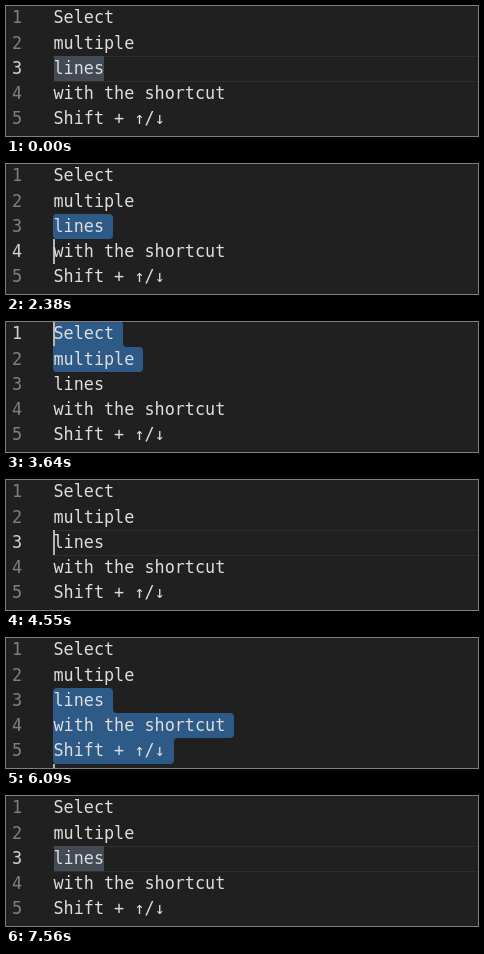
Animation of 472 by 130 pixels, one loop 7770 ms. Source, as an HTML page with a canvas:

```html
<!DOCTYPE html>
<html lang="en">
<head>
<meta charset="utf-8">
<title>Select lines</title>
<style>
  html, body { margin: 0; width: 100%; height: 100%; overflow: hidden; background: #202020; }
  #stage { position: relative; width: 472px; height: 130px; overflow: hidden; }
  canvas { position: absolute; left: 0; top: 0; }
  span {
    position: absolute;
    font: 16.8px/25px "DejaVu Sans Mono", monospace;
    white-space: pre;
    color: #dedede;
  }
  .num { left: 6px; color: #808080; }
  .num.active { color: #d2d2d2; }
  .code { left: 47.5px; }
</style>
</head>
<body>
<div id="stage"><canvas width="472" height="130"></canvas></div>
<script>
const LOOP = 7770;
const LINES = ["Select", "multiple", "lines", "with the shortcut", "Shift + ↑/↓"];
const ANCHOR = 3, LEFT = 47, CHAR = 10.11, ROW = 25.25;

// Key presses; each one walks the cursor a line further
const KEYS = [560, 840, 1260, 2030, 2380, 2660, 3360, 3640, 4200, 4550, 5250, 5530, 5880, 6580, 7000, 7280];
// The caret turns on, off, on ...
const BLINKS = [350, 840, 1260, 1820, 2380, 2660, 3220, 4690, 5250, 5530, 6090, 6580, 7000, 7560];

const stage = document.getElementById("stage");
const ctx = stage.querySelector("canvas").getContext("2d");
const rowTop = n => Math.round(ROW * (n - 1) - 0.6);
const rowEnd = n => Math.floor(LEFT + (LINES[n - 1].length + 1) * CHAR);
const passed = (times, t) => times.filter(x => x <= t).length;

// Zigzag 3 → 6 → 1 → 6 → 3
const cursorLine = step => 1 + Math.abs((step + 7) % 10 - 5);
// The word under the cursor is marked late on the two middle visits
const wordMarked = t => !(t >= 2660 && t < 2940 || t >= 4550 && t < 4970);

function addText(cls, text, n) {
  const el = document.createElement("span");
  el.className = cls;
  el.textContent = text;
  el.style.top = rowTop(n) + "px";
  stage.append(el);
  return el;
}

const nums = LINES.map((line, i) => {
  addText("code", line, i + 1);
  return addText("num", i + 1, i + 1);
});

function box(color, x, y, w, h) {
  ctx.fillStyle = color;
  ctx.fillRect(x, y, w, h);
}

function drawSelection(first, last) {
  const pts = [];
  for (let n = first; n <= last; n++) {
    pts.push([rowEnd(n), rowTop(n)], [rowEnd(n), rowTop(n + 1)]);
  }
  pts.push([LEFT, rowTop(last + 1)], [LEFT, rowTop(first)]);
  ctx.beginPath();
  ctx.moveTo(LEFT + 10, rowTop(first));
  pts.forEach((p, i) => ctx.arcTo(...p, ...pts[(i + 1) % pts.length], 4));
  ctx.closePath();
  ctx.fillStyle = "#2e5a88";
  ctx.fill();
}

function draw(t) {
  const line = cursorLine(passed(KEYS, t));
  const y = rowTop(line);
  box("#202020", 0, 0, 472, 130);

  if (line === ANCHOR) {
    box("#2e2e2e", LEFT, y, 472 - LEFT, 1);
    box("#2e2e2e", LEFT, y + 25, 472 - LEFT, 1);
    if (wordMarked(t)) box("#424a53", LEFT + 1, y, 50, 25);
  } else {
    drawSelection(Math.min(line, ANCHOR), Math.max(line, ANCHOR) - 1);
  }
  if (passed(BLINKS, t) % 2) box("#b4b4b4", LEFT, y, 2, 25);

  nums.forEach((el, i) => el.classList.toggle("active", i + 1 === line));
}

const start = performance.now();
function tick() {
  draw(Math.max(0, performance.now() - start) % LOOP);
  requestAnimationFrame(tick);
}
tick();
</script>
</body>
</html>
```
